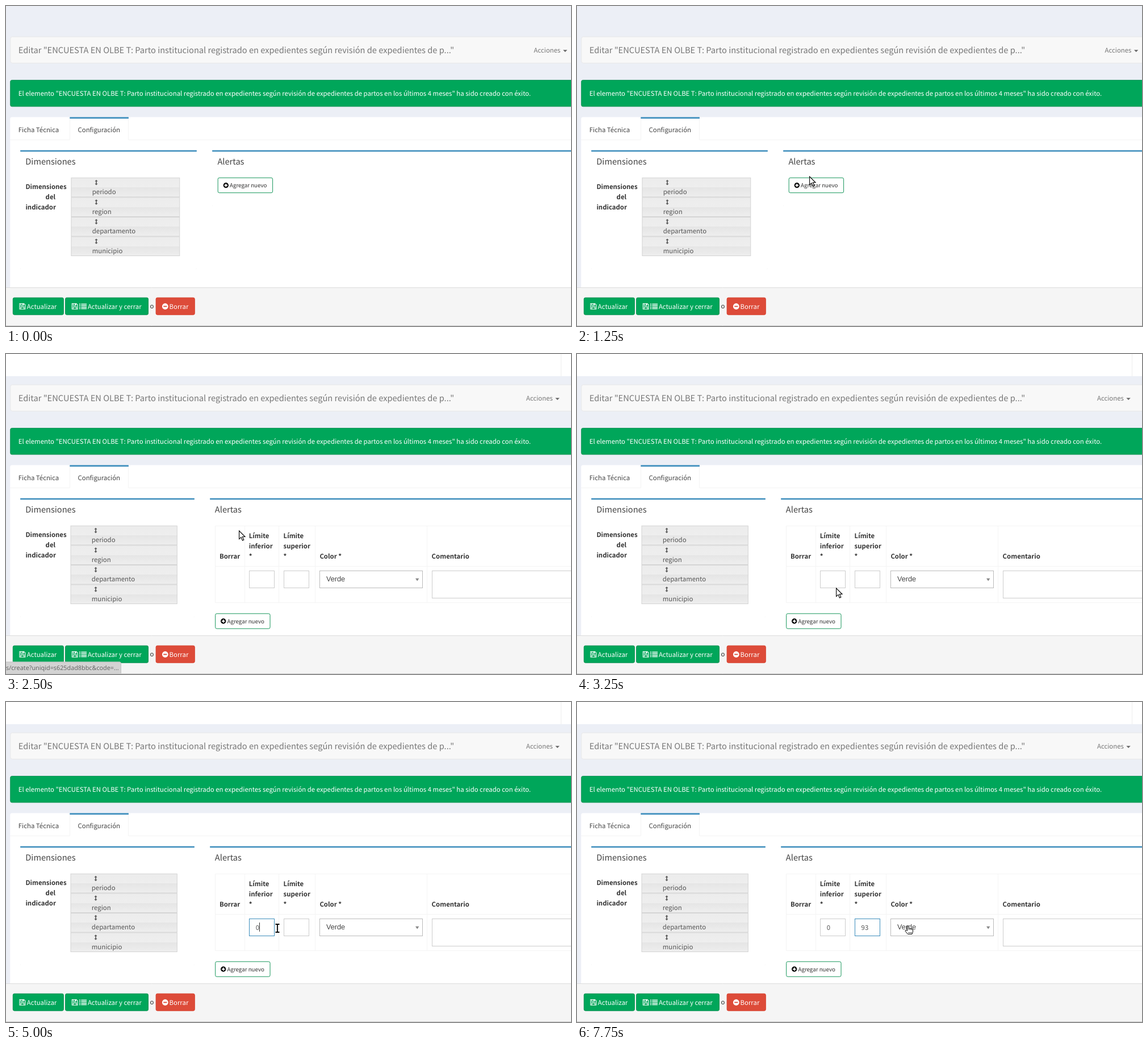
An HTML page for the animation above (8000 ms loop, 995 by 563 pixels).

```html
<!DOCTYPE html>
<html lang="es">
<head>
<meta charset="utf-8">
<title>Configuración del indicador</title>
<style>
html, body { margin: 0; width: 100%; height: 100%; overflow: hidden; background: #eceff6; }
svg { display: block; width: 100%; height: 100%; }
text {
  font: 11.39px "Noto Sans CJK JP", "Noto Sans CJK SC", "Noto Sans CJK KR", "Noto Sans CJK", sans-serif;
  fill: #333; text-rendering: geometricPrecision; white-space: pre;
}
.head { font-size: 14.64px; fill: #444; }
.small { font-size: 9.76px; }
.bold text, .bold { font-weight: 700; }
.light text, .light { fill: #fff; }
.soft { fill: #555; }
.system { font-family: "Noto Sans", sans-serif; font-size: 10.67px; }
.box { stroke-width: .91; }
.panel { fill: #fff; filter: drop-shadow(0 .9px .5px rgba(0,0,0,.1)); }
.bar { fill: #3c8dbc; }
.rule { stroke: #f4f4f4; fill: none; }
.field { fill: #fff; stroke: #ccc; }

.anim, .row rect, .row g { animation: 8s step-end infinite; }
.before { animation-name: before; }
.after { animation-name: after; }
.row rect { animation-name: rowBox; fill: url(#glass); stroke: #d0d0d0; stroke-width: .91; }
.row g { animation-name: rowText; }
#dimBox, #dimBar { animation-name: dimWidth; }
#alertsTitle { animation-name: alertsShift; }
#acciones { animation-name: accionesShift; }
#title { animation-name: titleHover; fill: #777; }
#hover { animation-name: hover; }
#status { animation-name: status; }
#arrow { animation-name: arrow; }
#hand { animation-name: hand; }
#ibeam { animation-name: ibeam; }
#tip { animation-name: tip; }
#caret { animation-name: caret; }
#focus1 { animation-name: focus1; }
#focus2 { animation-name: focus2; }
#zero { animation-name: zero; }
#nine { animation-name: nine; }
#three { animation-name: three; }

@keyframes before { 0% { visibility: visible } 31.25%, 100% { visibility: hidden } }
@keyframes after { 0% { visibility: hidden } 31.25%, 100% { visibility: visible } }
@keyframes rowBox { 0% { x: 114.9px; width: 190.9px } 31.25%, 100% { x: 114px; width: 187.3px } }
@keyframes rowText { 0% { transform: none } 31.25%, 100% { transform: translateX(-1px) } }
@keyframes dimWidth { 0% { width: 311px } 31.25%, 100% { width: 307px } }
@keyframes alertsShift { 0% { transform: none } 31.25%, 100% { transform: translateX(-4.55px) } }
@keyframes accionesShift { 0% { transform: none } 31.25%, 100% { transform: translateX(-13.6px) } }
@keyframes titleHover { 0% { fill: #777 } 6.25% { fill: #5e5e5e } 9.375%, 100% { fill: #777 } }
@keyframes hover {
  0% { opacity: 0 } 12.5% { opacity: .5 } 15.625% { opacity: 0 }
  18.75% { opacity: .9 } 25% { opacity: 1 } 31.25%, 100% { opacity: 0 }
}
@keyframes status {
  0% { opacity: 0 } 18.75% { opacity: .5 } 21.875% { opacity: 1 }
  34.375% { opacity: .5 } 37.5%, 100% { opacity: 0 }
}
@keyframes arrow {
  0% { visibility: hidden; transform: translate(250px,14px) }
  3.125% { visibility: visible; transform: translate(250px,14px) }
  6.25% { visibility: visible; transform: translate(390px,218px) }
  9.375% { visibility: visible; transform: translate(463px,329px) }
  12.5% { visibility: visible; transform: translate(409px,299px) }
  18.75% { visibility: hidden; transform: translate(409px,299px) }
  31.25% { visibility: visible; transform: translate(410px,310px) }
  37.5% { visibility: visible; transform: translate(459px,406px) }
  40.625% { visibility: visible; transform: translate(456px,411px) }
  43.75%, 100% { visibility: hidden; transform: translate(456px,411px) }
}
@keyframes hand {
  0% { visibility: hidden; transform: translate(405px,308px) }
  18.75% { visibility: visible; transform: translate(405px,308px) }
  31.25% { visibility: hidden; transform: translate(405px,308px) }
  96.875%, 100% { visibility: visible; transform: translate(577px,393px) }
}
@keyframes ibeam {
  0% { visibility: hidden; transform: translate(459px,398px) }
  43.75% { visibility: visible; transform: translate(459px,398px) }
  62.5% { visibility: visible; transform: translate(478px,398px) }
  65.625% { visibility: visible; transform: translate(501px,398px) }
  71.875% { visibility: visible; transform: translate(504px,398px) }
  96.875%, 100% { visibility: hidden; transform: translate(504px,398px) }
}
@keyframes tip { 0% { visibility: hidden } 50% { visibility: visible } 53.125%, 100% { visibility: hidden } }
@keyframes caret {
  0% { visibility: hidden; x: 440px }
  53.125% { visibility: visible; x: 440px }
  56.25% { visibility: visible; x: 446px }
  65.625% { visibility: hidden; x: 446px }
  71.875% { visibility: visible; x: 501px }
  81.25% { visibility: visible; x: 507px }
  87.5% { visibility: visible; x: 513px }
  93.75%, 100% { visibility: hidden; x: 513px }
}
@keyframes focus1 { 0% { stroke: #ccc } 56.25% { stroke: #3c8dbc } 75%, 100% { stroke: #ccc } }
@keyframes focus2 { 0% { stroke: #ccc } 75%, 100% { stroke: #3c8dbc } }
@keyframes zero { 0% { visibility: hidden } 56.25%, 100% { visibility: visible } }
@keyframes nine { 0% { visibility: hidden } 81.25%, 100% { visibility: visible } }
@keyframes three { 0% { visibility: hidden } 87.5%, 100% { visibility: visible } }
</style>
</head>
<body>
<svg viewBox="0 0 995 563">
  <defs>
    <linearGradient id="glass" x2="0" y2="1">
      <stop offset="0" stop-color="#ececec"/>
      <stop offset=".5" stop-color="#eee"/>
      <stop offset=".5" stop-color="#e5e5e5"/>
      <stop offset="1" stop-color="#eee"/>
    </linearGradient>
    <path id="sort" d="M0-4.8 2.6-2H.8V2H2.6L0 4.8-2.6 2H-.8V-2H-2.6Z" fill="#555"/>
    <path id="plus" d="M-4.7 0a4.7 4.7 0 1 0 9.4 0a4.7 4.7 0 1 0-9.4 0ZM-.9-2.8H.9V-.9H2.8V.9H.9V2.8H-.9V.9H-2.8V-.9H-.9Z" fill-rule="evenodd"/>
    <g id="floppy" fill="none" stroke="#fff" stroke-width="1.1">
      <path d="M.5.5H8L10.3 2.8V10.3H.5Z"/>
      <path d="M2.6.5V3.8H7.2V.5M2.6 10.3V6.4H8.2V10.3M6 1V3"/>
    </g>
  </defs>

  <rect width="995" height="563" fill="#eceff6"/>
  <g class="anim after">
    <rect width="995" height="39" fill="#fff"/>
    <path d="M977.5 0V39" stroke="#eee"/>
  </g>

  <rect class="box" x="7.73" y="54.1" width="1000" height="46.36" rx="3.6" fill="#f8f8f8" stroke="#e7e7e7"/>
  <text id="title" class="head anim" x="21.8" y="83">Editar "ENCUESTA EN OLBE T: Parto institucional registrado en expedientes según revisión de expedientes de p..."</text>
  <g id="acciones" class="anim">
    <text x="929.6" y="82" style="fill:#777">Acciones</text>
    <path d="M981 77.3H988.4L984.7 81Z" fill="#666"/>
  </g>

  <rect class="box" x="7.73" y="130.45" width="1000" height="46.36" rx="2.7" fill="#00a65a" stroke="#008d4c"/>
  <text class="light" x="21.8" y="158.2">El elemento "ENCUESTA EN OLBE T: Parto institucional registrado en expedientes según revisión de expedientes de partos en los últimos 4 meses" ha sido creado con éxito.</text>

  <path d="M7.27 199Q7.27 195.5 10 195.5H995V496H7.27Z" fill="#fff"/>
  <path class="rule" d="M7 235.5H112.5V196M215.5 196V235.5H995"/>
  <rect class="bar" x="112.3" y="195.45" width="103.6" height="2.73"/>
  <text x="21.8" y="222" style="fill:#444">Ficha Técnica</text>
  <text x="126.5" y="222" style="fill:#444">Configuración</text>

  <rect id="dimBox" class="panel anim" x="25" y="254" width="311" height="209" rx="2.5"/>
  <rect id="dimBar" class="bar anim" x="25" y="253.64" width="311" height="2.73" rx="1"/>
  <text class="head" x="34.3" y="279">Dimensiones</text>
  <g class="bold">
    <text x="34.4" y="322">Dimensiones</text>
    <text x="69.6" y="340">del</text>
    <text x="34.4" y="358">indicador</text>
  </g>
  <g class="row">
    <rect x="114.9" y="302.3" width="190.9" height="33.6"/>
    <rect x="114.9" y="336.8" width="190.9" height="33.6"/>
    <rect x="114.9" y="371.4" width="190.9" height="33.6"/>
    <rect x="114.9" y="405.9" width="190.9" height="33.6"/>
    <g>
      <use href="#sort" x="159" y="310.5"/><text class="soft" x="151.8" y="331">periodo</text>
      <use href="#sort" x="159" y="345"/><text class="soft" x="151.8" y="365.5">region</text>
      <use href="#sort" x="159" y="379.5"/><text class="soft" x="151.8" y="400">departamento</text>
      <use href="#sort" x="159" y="414"/><text class="soft" x="151.8" y="434.7">municipio</text>
    </g>
  </g>

  <g class="anim before">
    <rect class="panel" x="363" y="254" width="650" height="98" rx="2.5"/>
    <rect class="bar" x="363" y="253.64" width="650" height="2.73" rx="1"/>
    <g id="add">
      <rect class="box" x="373.2" y="302.27" width="96.4" height="26.36" rx="2.5" fill="#fff" stroke="#008d4c"/>
      <use href="#plus" x="387.3" y="315.5"/>
      <text class="small" x="394" y="319.3">Agregar nuevo</text>
    </g>
    <g id="hover" class="anim">
      <rect class="box" x="373.2" y="302.27" width="96.4" height="26.36" rx="2.5" fill="#008d4c" stroke="#00804a"/>
      <use href="#plus" x="387.3" y="315.5" fill="#fff"/>
      <text class="small light" x="394" y="319.3">Agregar nuevo</text>
    </g>
  </g>

  <g class="anim after">
    <rect class="panel" x="359" y="254" width="650" height="280" rx="2.5"/>
    <rect class="bar" x="359" y="253.64" width="650" height="2.73" rx="1"/>
    <path class="rule" d="M995 302.5H368.5V437.5H995M368 373.5H995M420.5 302V438M480.5 302V438M544.5 302V438M741.5 302V438"/>
    <g class="bold">
      <text x="376" y="360">Borrar</text>
      <text x="427.7" y="324">Límite</text>
      <text x="427.7" y="342">inferior</text>
      <text x="427.7" y="360">*</text>
      <text x="488.6" y="324">Límite</text>
      <text x="488.6" y="342">superior</text>
      <text x="488.6" y="360">*</text>
      <text x="552.4" y="360">Color *</text>
      <text x="749.6" y="360">Comentario</text>
    </g>
    <rect id="focus1" class="field anim" x="428.5" y="381.5" width="44" height="30"/>
    <rect id="focus2" class="field anim" x="489.5" y="381.5" width="44" height="30"/>
    <rect class="field" x="552.5" y="381.5" width="181" height="30" style="stroke:#bbb"/>
    <rect class="field" x="750.5" y="381.5" width="260" height="48"/>
    <text x="564" y="400" style="font:12.7px 'Liberation Sans',sans-serif;fill:#444">Verde</text>
    <path d="M721 394.7H727.4L724.2 399.5Z" fill="#888"/>
    <use href="#add" x="-4.55" y="154.55"/>
  </g>
  <text id="alertsTitle" class="head anim" x="372.4" y="279">Alertas</text>

  <text id="zero" class="soft anim" x="439.8" y="401">0</text>
  <text id="nine" class="soft anim" x="500.6" y="401">9</text>
  <text id="three" class="soft anim" x="506.9" y="401">3</text>
  <rect id="caret" class="anim" x="440" y="388" width="1" height="16" fill="#333"/>

  <rect y="495" width="995" height="68" fill="#f5f5f5"/>
  <path d="M0 495.5H995" stroke="#dcdcdc"/>
  <path d="M0 562.5H995" stroke="#ccc"/>
  <g class="box" fill="#00a65a" stroke="#008d4c">
    <rect x="12.27" y="513.2" width="89.1" height="30" rx="2.5"/>
    <rect x="104.5" y="513.2" width="146" height="30" rx="2.5"/>
    <rect x="264.1" y="513.2" width="68.2" height="30" rx="2.5" fill="#dd4b39" stroke="#d73925"/>
  </g>
  <use href="#floppy" x="23.5" y="523"/>
  <use href="#floppy" x="115.8" y="523"/>
  <path d="M129 524.5H131M132.3 524.5H142M129 527.2H131M132.3 527.2H142M129 529.9H131M132.3 529.9H142M129 532.6H131M132.3 532.6H142" stroke="#fff" stroke-width="1.5"/>
  <circle cx="280.3" cy="528.5" r="5.4" fill="#fff"/>
  <path d="M277.2 528.5H283.4" stroke="#dd4b39" stroke-width="1.8"/>
  <g class="light">
    <text x="36.8" y="532.8">Actualizar</text>
    <text x="143.9" y="532.8">Actualizar y cerrar</text>
    <text x="287.6" y="532.8">Borrar</text>
  </g>
  <text x="253.6" y="532">o</text>

  <g id="status" class="anim">
    <path d="M0 541.5H200Q202.5 541.5 202.5 544V562H0Z" fill="#d3d3d3"/>
    <path d="M0 542H200Q202.5 542 202.5 544.5V562" fill="none" stroke="#c4c4c4"/>
    <text class="system" x="0" y="556" style="font-size:10.8px;fill:#666">s/create?uniqid=s625dad8bbc&amp;code=...</text>
  </g>

  <g id="tip" class="anim">
    <rect x="466.5" y="410.5" width="129" height="24" fill="#f8e7a0" stroke="#d3c58c" style="filter:drop-shadow(0 2px 2px rgba(0,0,0,.35))"/>
    <text class="system" x="473.2" y="426" style="fill:#222">Please fill out this field.</text>
  </g>

  <path id="arrow" class="anim" d="M.6 1V15.6L4 12.4 6.4 18 8.8 17 6.4 11.5H11Z" fill="#fff" stroke="#000" stroke-width="1.1"/>
  <g id="hand" class="anim" stroke="#000" stroke-linejoin="round">
    <path d="M4.5 8V2Q4.5.6 5.8.6T7.2 2V5.2Q8.6 4.6 9.5 5.7Q11 5 11.8 6.2Q14.5 5.8 14.5 8V11.5L13 15.4H5.5L1.2 10.2Q.6 8.6 2.2 8.4Q3.4 8.4 4.5 9.6Z" fill="#fff"/>
    <path d="M6 13H13" stroke-width=".8"/>
    <path d="M7.2 5V8M9.6 6V8M12 6.4V8.2" fill="none" stroke-width=".8"/>
  </g>
  <g id="ibeam" class="anim" fill="none">
    <path d="M-3.5-7H-1L0-6 1-7H3.5M0-6V6M-3.5 7H-1L0 6 1 7H3.5" stroke="#fff" stroke-width="3"/>
    <path d="M-3.5-7H-1L0-6 1-7H3.5M0-6V6M-3.5 7H-1L0 6 1 7H3.5" stroke="#000" stroke-width="1.8"/>
  </g>
</svg>
</body>
</html>
```
